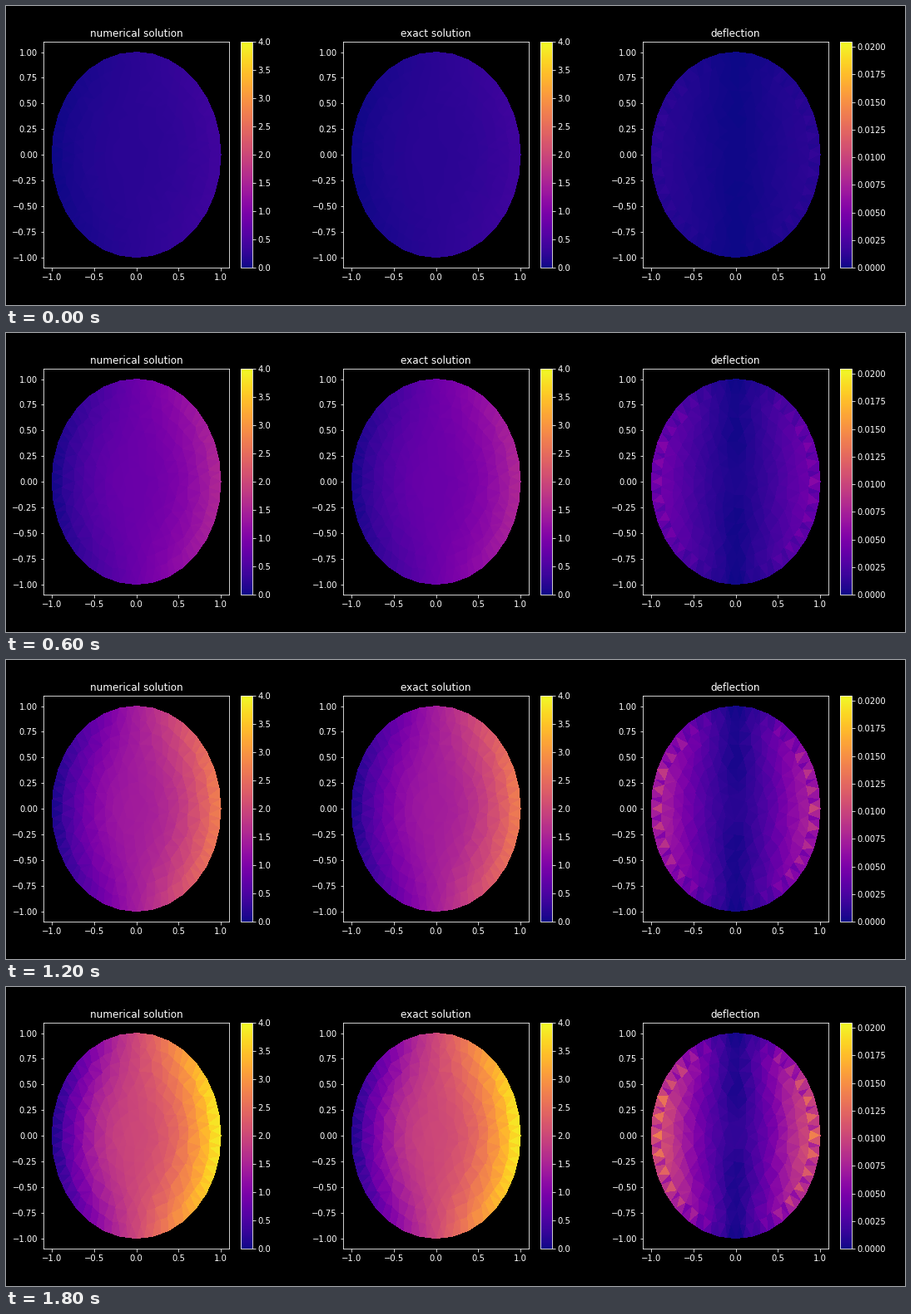
A matplotlib script for the animation above (2000 ms loop, 1080x360 px).

```python
import numpy as np
import matplotlib.pyplot as plt
from matplotlib.animation import FuncAnimation
from matplotlib.tri import Triangulation

W, H, DPI = 1080, 360, 72
FRAMES, STEP_MS = 10, 200
SIDES = 32
ERR_MAX = 0.02044

plt.style.use("dark_background")
rng = np.random.default_rng(11)


def polar(r, angle):
    return np.column_stack((r * np.cos(angle), r * np.sin(angle)))


def make_mesh(h=0.122):
    """Disc mesh: polygon corners, side midpoints, then jittered inner rings."""
    step = 2 * np.pi / SIDES
    k = np.arange(SIDES)
    corners = polar(1, k * step)
    mids = polar(np.cos(step / 2) * 1.00001, (k + 0.5) * step)
    # the first ring leaves wide triangles at corners, narrow ones at midpoints
    m = np.arange(2 * SIDES)
    shift = 0.5 + 0.15 * (-1.0) ** m + rng.uniform(-0.1, 0.1, m.size)
    rings = [polar(0.87 + rng.uniform(-0.015, 0.015, m.size),
                   (m + shift) * step / 2)]
    for r in np.arange(0.75, 0.05, -0.12):
        n = round(2 * np.pi * r / h)
        p = polar(r, (np.arange(n) + rng.random()) * 2 * np.pi / n)
        rings.append(p + rng.uniform(-0.022, 0.022, p.shape))
    pts = np.vstack((corners, mids, *rings))
    return Triangulation(pts[:, 0], pts[:, 1])


def node_error(x, y):
    r = np.hypot(x, y)
    e = 0.0128 * np.abs(x) * r ** 0.2 + 0.001 * np.exp(-(r / 0.22) ** 2)
    e *= rng.uniform(0.95, 1.05, x.size)
    # corners of the polygon carry the largest error, side midpoints almost none
    c = x[:SIDES]
    low = np.where(c < 0, 0.85, 0.65)
    e[:SIDES] = 0.0205 * np.abs(c) ** 1.2 * rng.uniform(low, 1.05)
    e[SIDES:2 * SIDES] *= 0.12
    return e


mesh = make_mesh()
x, y = mesh.x, mesh.y
exact = 2 + 2 * x * np.hypot(x, y)
error = node_error(x, y)
numeric = exact + np.sign(x) * error

fig = plt.figure(figsize=(W / DPI, H / DPI), dpi=DPI)


def px_axes(left, width):
    return fig.add_axes([left / W, 45 / H, width / W, 271.8 / H])


def add_panel(left, title, values, vmax):
    ax = px_axes(left, 223.2)
    mappable = ax.tripcolor(mesh, values, cmap="plasma", vmin=0, vmax=vmax)
    ax.set(xlim=(-1.1, 1.1), ylim=(-1.1, 1.1))
    ax.set_title(title)
    fig.colorbar(mappable, cax=px_axes(left + 237.15, 13.59))
    return mappable, values[mesh.triangles].mean(axis=1)


panels = [
    add_panel(45, "numerical solution", numeric, 4),
    add_panel(405, "exact solution", exact, 4),
    add_panel(765, "deflection", error, ERR_MAX),
]


def update(i):
    t = (i + 1) / FRAMES
    for mappable, cells in panels:
        mappable.set_array(t * cells)
    return [mappable for mappable, _ in panels]


anim = FuncAnimation(fig, update, frames=FRAMES, interval=STEP_MS,
                     init_func=lambda: update(0), repeat=True, repeat_delay=0)
plt.show()
```
